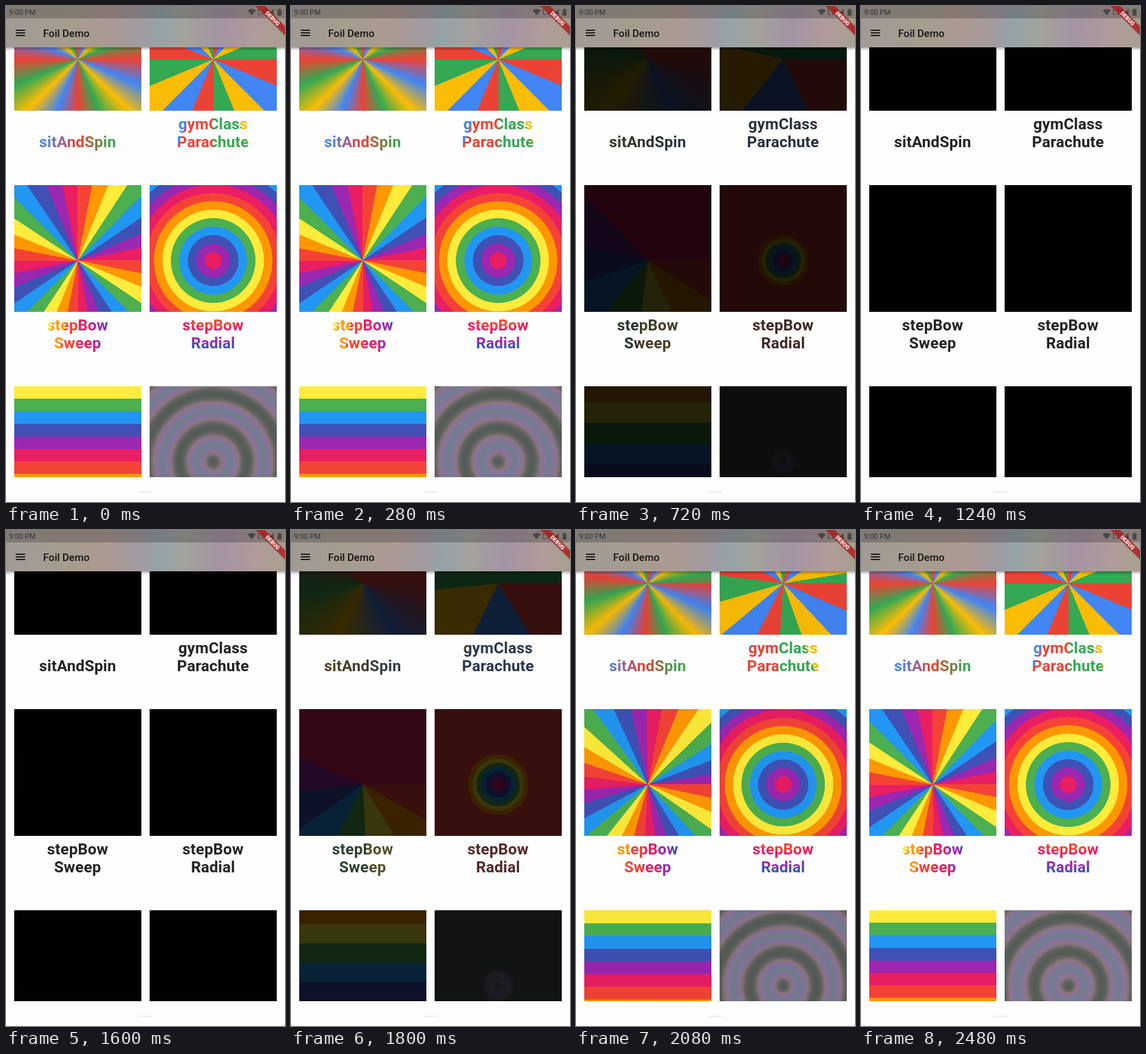
These frames come from a looping animation (406 by 720 pixels, 2.52 s). An HTML page:

```html
<!DOCTYPE html>
<html lang="en">
<head>
<meta charset="utf-8">
<title>Foil Demo</title>
<style>
html, body { margin: 0; width: 100%; height: 100%; overflow: hidden; background: #fefefe; }
#stage { position: relative; width: 406px; height: 720px; overflow: hidden; background: #fefefe; }
#list { position: absolute; left: 0; top: 0; width: 406px; height: 684px; overflow: hidden; }
.cell { position: absolute; width: 184.5px; height: 292px; }
.tile, .label { position: absolute; left: 0; top: 0; width: 184.5px; }
.tile { height: 184px; }
.label {
  height: 60px; padding-top: 190px; text-align: center; color: transparent;
  font: 700 22.5px/26px Roboto, sans-serif; letter-spacing: .19px;
  -webkit-background-clip: text; background-clip: text;
}
svg { position: absolute; left: 0; top: 0; font-family: Roboto, sans-serif; }
</style>
</head>
<body>
<div id="stage">
  <div id="list"></div>
  <svg width="406" height="720" viewBox="0 0 406 720">
    <defs>
      <linearGradient id="bar" gradientUnits="userSpaceOnUse" x1="0" y1="20" x2="406" y2="44">
        <stop offset="0" stop-color="#a19b95"/>
        <stop offset=".22" stop-color="#a69c8f"/>
        <stop offset=".37" stop-color="#ac9a92"/>
        <stop offset=".47" stop-color="#a39aa0"/>
        <stop offset=".55" stop-color="#95a3a9"/>
        <stop offset=".64" stop-color="#a3a29a"/>
        <stop offset=".77" stop-color="#a494a5"/>
        <stop offset=".9" stop-color="#b09b99"/>
        <stop offset="1" stop-color="#a99f90"/>
      </linearGradient>
      <linearGradient id="shade" x2="0" y2="1">
        <stop offset="0" stop-opacity=".3"/>
        <stop offset="1" stop-opacity="0"/>
      </linearGradient>
    </defs>
    <rect y="60" width="406" height="5" fill="url(#shade)"/>
    <rect width="406" height="60" fill="url(#bar)"/>
    <rect width="406" height="18" fill="#000" opacity=".22"/>
    <text x="4.500" y="13" font-size="10.500" fill="#333">9:00 PM</text>
    <g fill="#484848">
      <path d="M351.500 6.500Q357.500 2 363.500 6.500L357.500 13.500Z"/>
      <text x="366" y="13" font-size="10" font-weight="500">LTE</text>
      <path d="M380 13.500L389.500 4V13.500Z"/>
      <path d="M395 5.500h1.700v-1.500h2.600v1.500h1.700v8.500h-6z"/>
    </g>
    <path d="M14.250 35.250h13.500M14.250 39h13.500M14.250 42.750h13.500" stroke="#000" stroke-width="1.500"/>
    <text x="54" y="45" font-size="15" font-weight="500" fill="#151515">Foil Demo</text>
    <g transform="translate(406 0) rotate(45)">
      <rect x="-31" y="20" width="62" height="11" fill="#000" opacity=".15"/>
      <rect x="-30" y="21" width="60" height="9" fill="#b71c1c" opacity=".8"/>
      <text y="28.300" font-size="8" font-weight="900" fill="#fff" text-anchor="middle">DEBUG</text>
    </g>
    <rect x="192" y="704.500" width="22" height="2.500" rx="1.200" fill="#f1eeee"/>
  </svg>
</div>
<script>
const LOOP = 2520;
const hex = s => s.split(' ').map(h => [0, 2, 4].map(i => parseInt(h.substr(i, 2), 16)));
const BOW = hex('f44336 ff9800 ffeb3b 4caf50 2196f3 3f51b5 9c27b0 e91e63');
const BOW_BACK = [...BOW].reverse();
const WHEEL = hex('ea4335 4285f4 fbbc05 34a853');
const HALF = hex('515b54 5f615e 8b7680 8473a0 6d8086');
const STEEL = [...HALF, ...HALF.slice(0, -1).reverse()];
const BLACK = [0, 0, 0], INK = [33, 33, 33];

const mix = (a, b, k) => `rgb(${a.map((v, i) => Math.round(b[i] + (v - b[i]) * k))})`;

// Equal bands with a hairline blend between neighbours
const bands = (cols, w, unit, soft, from = 0) => cols.map((c, i) =>
  `${c} ${from + i * w + (i ? soft : 0)}${unit} ${from + (i + 1) * w - soft}${unit}`).join();
const blend = (cols, size, unit) => cols.map((c, i) =>
  `${c} ${size * i / (cols.length - 1)}${unit}`).join();

const AT = '92.5px 109.5px';
const sweep = s => 90 + 270 * s;
const ring = s => 98.4 * (1 - .93 * s);

const conic = stops => `conic-gradient(from 90deg at ${AT}, ${stops})`;
const radial = stops => `radial-gradient(circle at ${AT}, ${stops})`;

const foils = [
  { x: 12, y: -32, text: ['', 'sitAndSpin'], cols: WHEEL,
    make: (c, s) => conic(blend([...c, c[0]], sweep(s), 'deg')) },
  { x: 209, y: -32, text: ['gymClass', 'Parachute'], cols: WHEEL,
    make: (c, s) => conic(bands(c, sweep(s) / 4, 'deg', .15)) },
  { x: 12, y: 260, text: ['stepBow', 'Sweep'], cols: BOW,
    make: (c, s) => conic(bands(c, sweep(s) / 8, 'deg', .15)) },
  { x: 209, y: 260, text: ['stepBow', 'Radial'], cols: BOW_BACK,
    make: (c, s) => radial(bands(c, ring(s) / 8, 'px', .35)) },
  { x: 12, y: 552, cols: BOW,
    make: (c, s) => `linear-gradient(180deg, ${bands(c, 18.25 + 18.9 * s, 'px', .25, -36.7)})` },
  { x: 209, y: 552, cols: STEEL,
    make: (c, s) => radial(blend(c, ring(s) / 2, 'px')) }
];

function add(parent, cls) {
  const el = document.createElement('div');
  el.className = cls;
  parent.append(el);
  return el;
}

for (const f of foils) {
  const cell = add(document.getElementById('list'), 'cell');
  cell.style.left = f.x + 'px';
  cell.style.top = f.y + 'px';
  f.tile = add(cell, 'tile');
  if (!f.text) continue;
  f.label = add(cell, 'label');
  f.text.forEach(t => { add(f.label, 'line').textContent = t || '\u00a0'; });
}

const ease = (t, a, b) => {
  const u = Math.min(1, Math.max(0, (t - a) / (b - a)));
  return u * u * (3 - 2 * u);
};

// Repeats while mostly lit, then lets the last colour run on
function paint(f, s, base, k) {
  const g = f.make(f.cols.map(c => mix(c, base, k)), s);
  return s < .5 ? 'repeating-' + g : g;
}

function draw(t) {
  const s = ease(t, 480, 894) - ease(t, 1500, 2124);
  const k = (1 - s) ** 2;
  for (const f of foils) {
    f.tile.style.backgroundImage = paint(f, s, BLACK, k);
    if (f.label) f.label.style.backgroundImage = paint(f, s, INK, k);
  }
}

const start = performance.now();
function tick() {
  draw((performance.now() - start) % LOOP);
  requestAnimationFrame(tick);
}
tick();
</script>
</body>
</html>
```
